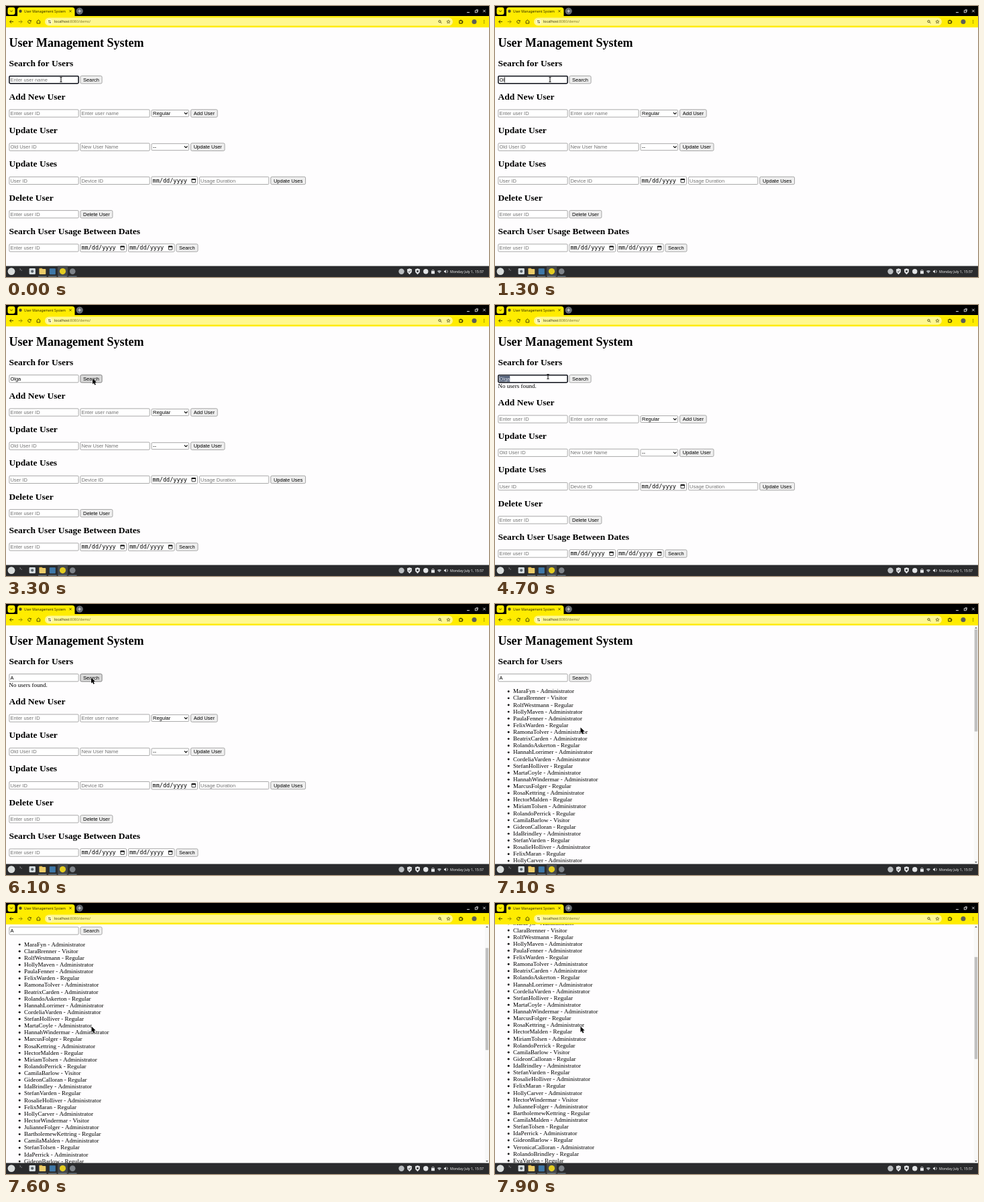
Animation, 720 px wide and 405 px high, one loop 8000 ms. Source, as an HTML page with a canvas:

```html
<!DOCTYPE html>
<html lang="en">
<head>
<meta charset="utf-8">
<title>User Management System</title>
<style>
  html, body { margin: 0; width: 100%; height: 100%; overflow: hidden; background: #fefdfe; }
  canvas { display: block; width: 720px; height: 405px; }
</style>
</head>
<body>
<canvas id="stage"></canvas>
<script>
const W = 720, H = 405, LOOP = 8000;
const canvas = document.getElementById('stage');
const ctx = canvas.getContext('2d');
const dpr = window.devicePixelRatio || 1;
canvas.width = W * dpr;
canvas.height = H * dpr;

const SERIF = '"Liberation Serif", serif';
const SANS = '"Liberation Sans", sans-serif';
const MONO = '"DejaVu Sans Mono", monospace';
const UI = '"Noto Sans", sans-serif';
const YELLOW = '#ffec00';
const BORDER = '#858585';
const TOP = 32;           // page area
const BOTTOM = 388.7;
const LINE = 10.125;      // list line height
const STEP = 50.25;       // distance between form sections
const FIELD = 104;
const WORD = 'Olga';

const ROLES = { A: 'Administrator', R: 'Regular', V: 'Visitor' };
const users = `MaraFyn A,ClaraBrenner V,RolfWestmann R,HollyMaven A,PaulaFenner A,
FelixWarden R,RamonaTolver A,BeatrixCarden A,RolandoAskerton R,HannahLorrimer A,
CordeliaVarden A,StefanHolliver R,MartaCoyle A,HannahWindermar A,MarcusFolger R,
RosaKettring A,HectorMalden R,MiriamTolsen A,RolandoPerrick R,CamilaBarlow V,
GideonCalloran R,IdaBrindley A,StefanVarden R,RosalieHolliver A,FelixMaran R,
HollyCarver A,HectorWindermar V,JulianneFolger A,BartholemewKettring R,CamilaMalden A,
StefanTolsen R,IdaPerrick A,GideonBarlow R,VeronicaCalloran A,RolandoBrindley R,
EvaVarden R`.split(',').map(s => {
  const [name, role] = s.trim().split(' ');
  return name + ' - ' + ROLES[role];
});

// Keys: [time, ...values]
const pointerKeys = [
  [0, 82, 110], [2000, 82, 110], [2800, 129, 109.8], [3600, 129, 109.8],
  [4300, 79, 107], [5200, 79, 107], [5900, 127, 110], [6250, 127, 110], [6800, 127.5, 184.6]
];
const scrollKeys = [[7130, 0], [7600, 68.5], [7900, 99.8], [8000, 108]];
const ease = p => p * p * (3 - 2 * p);

function track(keys, t, curve = p => p) {
  if (t <= keys[0][0]) return keys[0].slice(1);
  for (let i = 1; i < keys.length; i++) {
    const a = keys[i - 1], b = keys[i];
    if (t < b[0]) {
      const p = curve((t - a[0]) / (b[0] - a[0]));
      return a.slice(1).map((v, k) => v + (b[k + 1] - v) * p);
    }
  }
  return keys[keys.length - 1].slice(1);
}

function text(s, x, y, size, family, color = '#000', weight = '') {
  ctx.font = `${weight} ${size}px ${family}`;
  ctx.fillStyle = color;
  ctx.fillText(s, x, y);
}
function rect(x, y, w, h, color) {
  ctx.fillStyle = color;
  ctx.fillRect(x, y, w, h);
}
function round(x, y, w, h, r, fill, stroke, lw = 0.7) {
  ctx.beginPath();
  ctx.roundRect(x, y, w, h, r);
  if (fill) { ctx.fillStyle = fill; ctx.fill(); }
  if (stroke) { ctx.strokeStyle = stroke; ctx.lineWidth = lw; ctx.stroke(); }
}
function disc(x, y, r, fill, stroke, lw = 0.8) {
  round(x - r, y - r, 2 * r, 2 * r, r, fill, stroke, lw);
}
function path(points, stroke, lw = 1, fill) {
  ctx.beginPath();
  for (let i = 0; i < points.length; i += 2) ctx.lineTo(points[i], points[i + 1]);
  if (fill) { ctx.closePath(); ctx.fillStyle = fill; ctx.fill(); }
  if (stroke) { ctx.strokeStyle = stroke; ctx.lineWidth = lw; ctx.stroke(); }
}

function input(x, cy, hint) {
  round(x + 0.4, cy - 5.6, FIELD - 0.8, 11.2, 1.2, '#fff', BORDER);
  if (hint) text(hint, x + 1.9, cy + 2.6, 7.5, SANS, '#757575');
}
function button(x, cy, w, label, hot) {
  round(x + 0.4, cy - 5.7, w - 0.8, 11.4, 1.8, hot ? '#dadada' : '#efefef', hot ? '#555' : BORDER);
  ctx.textAlign = 'center';
  text(label, x + w / 2, cy + 2.6, 7.5, SANS);
  ctx.textAlign = 'left';
}
function select(x, cy, label) {
  round(x + 0.4, cy - 5, 55.6, 10, 1.2, '#fff', BORDER);
  text(label, x + 2.4, cy + 2.6, 7.5, SANS);
  path([x + 49.3, cy - 1.2, x + 51.6, cy + 1.1, x + 53.9, cy - 1.2], '#000', 1.1);
}
function dateField(x, cy) {
  round(x + 0.4, cy - 5.9, 68.6, 11.8, 1.2, '#fff', BORDER);
  text('mm/dd/yyyy', x + 2, cy + 2.7, 8.5, MONO);
  round(x + 60.4, cy - 2.4, 5.4, 5.2, 0.5, null, '#000', 0.8);
  rect(x + 60, cy - 2.8, 6.2, 1.8, '#000');
}
function heading(s, y) { text(s, 4.5, y, 13.5, SERIF, '#000', 'bold'); }

function sections(dy) {
  const names = ['Add New User', 'Update User', 'Update Uses', 'Delete User', 'Search User Usage Between Dates'];
  names.forEach((s, i) => heading(s, 89.6 + dy + STEP * (i + 1)));
  const row = i => 110.2 + dy + STEP * i;
  const [c1, c2, c3] = [4.5, 110.5, 216.6];

  input(c1, row(1), 'Enter user ID');
  input(c2, row(1), 'Enter user name');
  select(c3, row(1), 'Regular');
  button(275.1, row(1), 40.5, 'Add User');

  input(c1, row(2), 'Old User ID');
  input(c2, row(2), 'New User Name');
  select(c3, row(2), '--');
  button(275.1, row(2), 51.3, 'Update User');

  input(c1, row(3), 'User ID');
  input(c2, row(3), 'Device ID');
  dateField(c3, row(3));
  input(288.2, row(3), 'Usage Duration');
  button(394.3, row(3), 52.6, 'Update Uses');

  input(c1, row(4), 'Enter user ID');
  button(c2, row(4), 48.8, 'Delete User');

  input(c1, row(5), 'Enter user ID');
  dateField(110.5, row(5));
  dateField(182, row(5));
  button(253.4, row(5), 33, 'Search');
}

function searchRow(t, px, py, scroll) {
  const cy = 110.2;
  const typed = t < 4950 ? WORD.slice(0, Math.max(0, Math.floor((t - 900) / 200))) : 'A';
  const focused = t < 3150 || (t >= 4450 && t < 6050);
  const selected = t >= 4600 && t < 4950;
  const overButton = px > 110 && px < 144 && py + scroll > 104 && py + scroll < 116;

  input(4.5, cy, typed ? '' : 'Enter user name');
  if (focused) round(4.9, cy - 5.5, FIELD - 0.8, 11, 1.4, null, '#10131c', 1.5);
  ctx.font = `7.5px ${SANS}`;
  const tw = ctx.measureText(typed).width;
  if (selected) rect(6.4, cy - 4.4, tw, 8.8, '#55627a');
  text(typed, 6.4, cy + 2.6, 7.5, SANS, selected ? '#dfe3ea' : '#000');

  const typing = (t >= 1100 && t < 2200) || (t >= 4950 && t < 5450);
  if (focused && !selected && (typing || t % 1000 >= 500)) rect(6.5 + tw, cy - 4.2, 0.7, 8.4, '#000');
  button(110.5, cy, 33, 'Search', overButton);
}

function page(t, px, py) {
  const scroll = track(scrollKeys, t)[0];
  const listed = t >= 6250;
  ctx.save();
  ctx.beginPath();
  ctx.rect(0, TOP, W, BOTTOM - TOP);
  ctx.clip();
  rect(0, TOP, W, BOTTOM - TOP, '#fefdfe');

  ctx.save();
  ctx.translate(0, -scroll);
  text('User Management System', 4.5, 61.2, 18, SERIF, '#000', 'bold');
  heading('Search for Users', 89.6);
  searchRow(t, px, py, scroll);
  if (listed) {
    users.forEach((s, i) => {
      const y = 133.3 + i * LINE;
      disc(20.2, y - 2.6, 1.45, '#000');
      text(s, 27, y, 9, SERIF);
    });
  } else {
    const found = t >= 3450;
    if (found) text('No users found.', 4.5, 124.3, 9, SERIF);
    sections(found ? LINE : 0);
  }
  ctx.restore();

  if (listed) {
    rect(713.8, TOP, 6.2, BOTTOM - TOP, '#f8f8f8');
    round(714.8, 38 + scroll * 0.427, 4.4, 152.5, 0.5, '#c1c1c1');
    path([715.2, 36.4, 717, 34.4, 718.8, 36.4], null, 1, '#505050');
    path([715.2, 385, 717, 387, 718.8, 385], null, 1, '#505050');
  }
  ctx.restore();
}

function browserBar() {
  const ink = '#3a3500';
  rect(0, 0, W, 16, '#000');
  rect(0, 15, W, TOP - 15, YELLOW);

  round(2.5, 2, 11, 11, 3, YELLOW);
  path([6.1, 6.7, 8, 8.6, 9.9, 6.7], ink, 1);
  round(17, 2, 85.5, 15, [4, 4, 0, 0], YELLOW);
  disc(21.5, 7.8, 2.2, '#4d4a30');
  text('User Management System', 27, 9.6, 5, UI, '#2c2800');
  path([94.4, 6.1, 97.6, 9.3], ink, 0.8);
  path([97.6, 6.1, 94.4, 9.3], ink, 0.8);
  disc(109.7, 7.6, 5.2, '#666b70');
  path([107.4, 7.6, 112, 7.6], '#eee', 0.8);
  path([109.7, 5.3, 109.7, 9.9], '#eee', 0.8);

  path([687, 9.6, 691, 9.6], '#eee', 0.9);
  ctx.strokeStyle = '#eee';
  ctx.lineWidth = 0.8;
  ctx.strokeRect(699.3, 6.8, 3, 3);
  path([700.6, 5.5, 703.5, 5.5, 703.5, 8.5], '#eee', 0.7);
  path([711.2, 5.7, 714.8, 9.3], '#eee', 0.9);
  path([714.8, 5.7, 711.2, 9.3], '#eee', 0.9);

  // navigation
  path([11, 23.5, 5.6, 23.5], ink, 0.9);
  path([8.1, 21, 5.6, 23.5, 8.1, 26], ink, 0.9);
  path([18.7, 23.5, 24.1, 23.5], '#8f8500', 0.9);
  path([21.6, 21, 24.1, 23.5, 21.6, 26], '#8f8500', 0.9);
  ctx.beginPath();
  ctx.arc(35, 23.5, 2.3, 0.4, 5.5);
  ctx.strokeStyle = ink;
  ctx.lineWidth = 0.9;
  ctx.stroke();
  path([37.6, 20.8, 37.6, 23.2, 35.2, 23.2], null, 1, ink);
  path([46.1, 26, 46.1, 22.7, 48.4, 20.8, 50.7, 22.7, 50.7, 26, 46.1, 26], ink, 0.9);

  round(58, 17.6, 608, 12, 6, '#fff891');
  disc(65, 23.5, 4.1, '#fffbc8');
  path([63, 22.3, 67, 22.3], ink, 0.6);
  path([63, 24.8, 67, 24.8], ink, 0.6);
  disc(64, 22.3, 0.7, ink);
  disc(66, 24.8, 0.7, ink);
  text('localhost', 72, 25.4, 5.3, UI, '#35310a');
  const hostWidth = ctx.measureText('localhost').width;
  text(':8080/demo/', 72 + hostWidth, 25.4, 5.3, UI, '#827b25');

  disc(646.5, 23, 1.6, null, ink, 0.8);
  path([647.8, 24.3, 649.4, 25.9], ink, 0.9);
  const star = [];
  for (let i = 0; i <= 10; i++) {
    const r = i % 2 ? 1.2 : 2.7, a = -Math.PI / 2 + i * Math.PI / 5;
    star.push(659.5 + r * Math.cos(a), 23.6 + r * Math.sin(a));
  }
  path(star, ink, 0.6);
  round(675.8, 21.7, 4.4, 4.2, 0.5, null, ink, 1.1);
  disc(678, 21.4, 1, ink);
  disc(680.5, 23.8, 1, ink);
  disc(698, 23.5, 3.5, '#5d5f58');
  for (let i = -1; i <= 1; i++) disc(712.7, 23.5 + i * 2, 0.6, ink);
}

function taskbar() {
  const base = '#2a2b2d';
  rect(0, BOTTOM, W, H - BOTTOM, base);
  rect(77, BOTTOM, 15, H - BOTTOM, '#45484b');
  for (const x of [48, 63, 78, 93]) rect(x, 403.6, 12.5, 1, '#7b8f9c');

  disc(8, 396.6, 5.4, '#d9dddc');
  path([20.5, 392.5, 22, 393.5, 20.5, 394.5], '#c4c8cc', 0.6);
  path([22.3, 395, 24, 395], '#c4c8cc', 0.6);
  round(34.6, 392, 9.3, 9, 1.3, '#d6dde0');
  disc(39.2, 396.6, 2.1, '#59636a');
  round(49.5, 391.8, 4.7, 3, 0.8, '#d1aa45');
  round(49.5, 393, 9.8, 8, 0.9, '#ebcb69');
  round(64.8, 392.2, 9, 9, 1, '#3f78a8');
  disc(84.5, 396.6, 4.6, '#e3cc20');
  disc(99.2, 396.6, 4.3, '#7d8288');

  // status icons
  const pale = '#e2e4e6';
  disc(589.5, 396.8, 4.2, '#b9bdc0');
  for (const x of [601.5, 613.5])
    path([x, 392.3, x + 3.6, 393.6, x + 3.2, 398, x, 401.2, x - 3.2, 398, x - 3.6, 393.6], null, 1, pale);
  path([599.8, 396.7, 601.1, 398, 603.2, 395.2], base, 0.8);
  disc(613.5, 396.5, 1.4, base);
  disc(625.8, 396.8, 3.7, pale);
  round(634, 396, 5, 4.2, 0.5, pale);
  ctx.beginPath();
  ctx.arc(636.5, 396, 1.7, Math.PI, 0);
  ctx.strokeStyle = pale;
  ctx.lineWidth = 0.8;
  ctx.stroke();
  ctx.beginPath();
  ctx.moveTo(646, 399.5);
  ctx.arc(646, 399.5, 4.5, -Math.PI * 0.75, -Math.PI * 0.25);
  ctx.fillStyle = '#a6abb0';
  ctx.fill();
  path([653, 395.8, 654.2, 395.8, 656, 394.2, 656, 399.4, 654.2, 397.8, 653, 397.8], null, 1, pale);
  ctx.beginPath();
  ctx.arc(655.5, 396.8, 2.8, -0.8, 0.8);
  ctx.stroke();
  text('Monday July 1, 15:57', 662, 398.8, 5.2, UI, '#f2f2f2', '500');
}

function pointer(x, y) {
  if (x < 108.5 && y > 104 && y < 116) {
    path([x - 1.7, y - 3.4, x + 1.7, y - 3.4], '#000', 0.8);
    path([x - 1.7, y + 3.4, x + 1.7, y + 3.4], '#000', 0.8);
    path([x, y - 3.4, x, y + 3.4], '#000', 1);
    return;
  }
  const shape = [0, 0, 0, 8.4, 1.9, 6.7, 3.3, 9.8, 4.9, 9.1, 3.5, 6.1, 6.1, 5.9];
  path(shape.concat(0, 0).map((v, i) => v + (i % 2 ? y : x)), '#fff', 1);
  path(shape.map((v, i) => v + (i % 2 ? y : x)), null, 1, '#000');
}

function draw(t) {
  ctx.setTransform(dpr, 0, 0, dpr, 0, 0);
  const [px, py] = track(pointerKeys, t, ease);
  page(t, px, py);
  browserBar();
  taskbar();
  pointer(px, py);
}

const start = performance.now();
function tick() {
  draw((performance.now() - start) % LOOP);
  requestAnimationFrame(tick);
}
tick();
</script>
</body>
</html>
```
